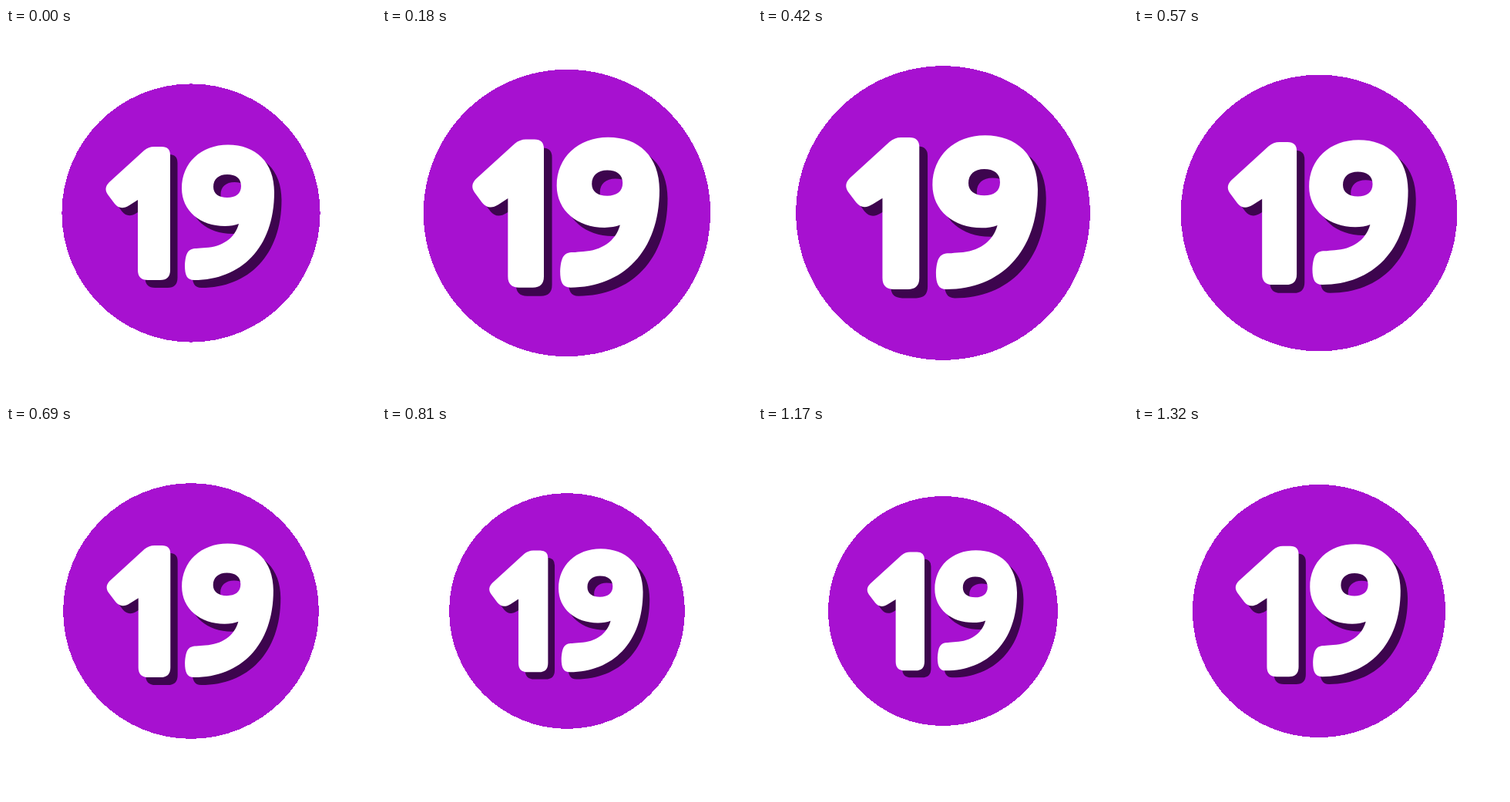
Write an HTML page that moves like this. It is 480x480 px and loops after 1.35 s.

```html
<!DOCTYPE html>
<html lang="en">
<head>
<meta charset="utf-8">
<title>19</title>
<style>
  html, body { margin: 0; width: 100%; height: 100%; overflow: hidden; background: #fff; }
  svg { display: block; width: 100vw; height: 100vh; }
</style>
</head>
<body>
<svg viewBox="0 0 480 480" role="img" aria-label="19">
  <defs>
    <filter id="soft" x="-10%" y="-10%" width="120%" height="120%">
      <feGaussianBlur stdDeviation="0.6"/>
    </filter>
    <g id="digits" fill-rule="evenodd">
      <path d="M192 154 H202 Q213 154 213 165 V314 Q213 327 200 327 H184 Q171 327 171 314 V223
               L160 230 C152 235 146 234 141 228 L132 216 C128 210 129 205 134 200
               L179 159 Q185 154 192 154 Z"/>
      <path d="M288 151.5 C253 151.5 228 175 228 208 C228 237 252 257 284 257
               C291 257 297 256 302 254 C297 273 280 284 259 285
               C255 285 250 286 247 286 C236 286 233 292 232 308
               C232 321 235 327 244 327 C305 327 348 285 348 213
               C348 174 324 151.5 288 151.5 Z
               M287 190 C298 190 305 195 305 205 C305 215 298 220 287 220
               C276 220 269 215 269 206 C269 196 276 190 287 190 Z"/>
    </g>
  </defs>
  <g id="badge">
    <circle cx="240" cy="240" r="167.6" fill="#a711d0" shape-rendering="crispEdges"/>
    <use href="#digits" x="9.5" y="10" fill="#3d054e" filter="url(#soft)"/>
    <use href="#digits" fill="#fff"/>
  </g>
</svg>
<script>
  const LOOP = 1350, STEP = 30, SWING = 25 / 167.6;
  const badge = document.getElementById('badge');
  const start = performance.now();

  function draw(now) {
    const elapsed = Math.max(0, now - start) % LOOP;
    const t = Math.floor(elapsed / STEP) * STEP;
    const scale = 1 + SWING * Math.sin(2 * Math.PI * t / LOOP);
    badge.setAttribute('transform', `translate(240 240) scale(${scale}) translate(-240 -240)`);
    requestAnimationFrame(draw);
  }
  draw(start);
</script>
</body>
</html>
```
